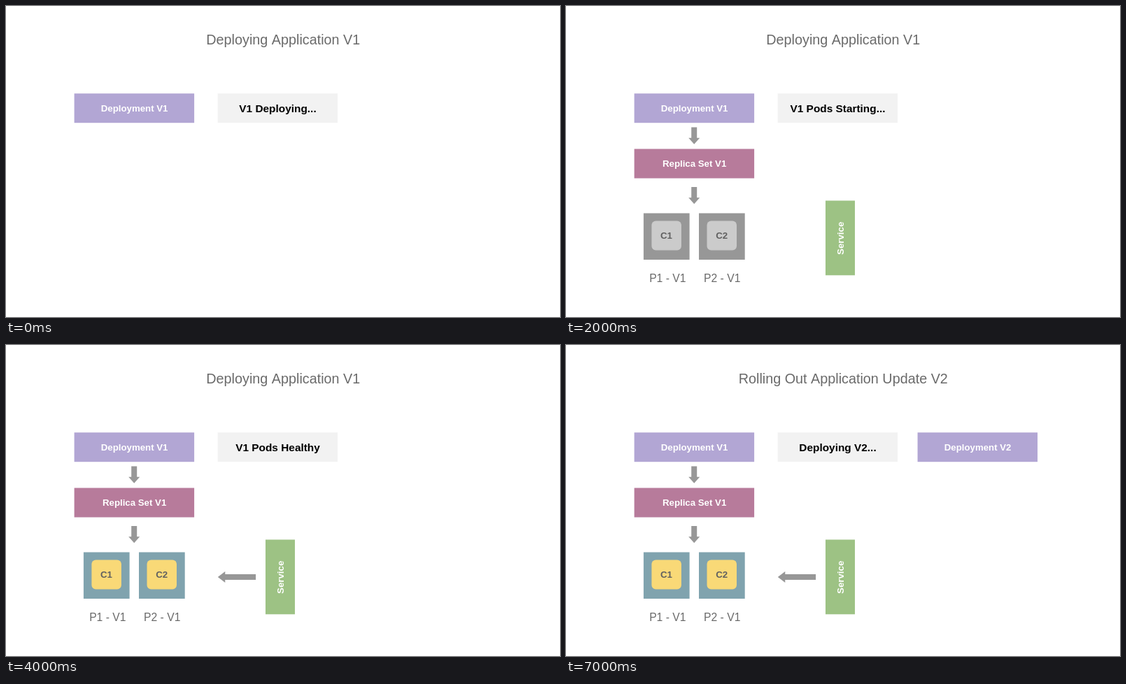
Animation, 792 px wide and 445 px high, one loop 8000 ms. Source, as an HTML page with a canvas:

```html
<!DOCTYPE html>
<html lang="en">
<head>
<meta charset="utf-8">
<title>Rolling deployment</title>
<style>
html, body { margin: 0; width: 100%; height: 100%; overflow: hidden; background: #fff; }
canvas { display: block; width: 792px; height: 445px; }
</style>
</head>
<body>
<canvas id="stage" width="792" height="445"></canvas>
<script>
const ctx = document.getElementById('stage').getContext('2d');
const LOOP = 8000;
const FONT = '"Liberation Sans", Arial, sans-serif';
const GRAY = '#979797', PURPLE = '#b2a6d4', PINK = '#b77b9b', GREEN = '#9dc284';
const TEAL = '#80a3ae', YELLOW = '#f9d977', SILVER = '#cbcbcb';

const titles = [
  [0, 'Deploying Application V1'],
  [5000, 'Application V1 Deployment Completed'],
  [7000, 'Rolling Out Application Update V2']
];
const statuses = [
  [0, 'V1 Deploying...'],
  [2000, 'V1 Pods Starting...'],
  [3000, 'V1 Pods Activating...'],
  [4000, 'V1 Pods Healthy'],
  [7000, 'Deploying V2...']
];

const current = (steps, t) => steps.filter(step => step[0] <= t).pop()[1];

function rect(x, y, w, h, color) {
  ctx.fillStyle = color;
  ctx.fillRect(x, y, w, h);
}

function text(str, x, y, size, color, weight = 'bold') {
  ctx.font = `${weight} ${size}px ${FONT}`;
  ctx.fillStyle = color;
  ctx.fillText(str, x, y);
}

function box(x, y, label, color) {
  rect(x, y, 171.5, 42, color);
  text(label, x + 86, y + 25.6, 13.25, '#fff');
}

// Arrow pointing along +x with its tip at (x, y)
function arrow(x, y, angle, length, head) {
  ctx.save();
  ctx.translate(x, y);
  ctx.rotate(angle);
  ctx.fillStyle = GRAY;
  ctx.beginPath();
  ctx.moveTo(0, 0);
  ctx.lineTo(-head, -8);
  ctx.lineTo(-head, -4);
  ctx.lineTo(-length, -4);
  ctx.lineTo(-length, 4);
  ctx.lineTo(-head, 4);
  ctx.lineTo(-head, 8);
  ctx.fill();
  ctx.restore();
}

function pod(x, n, active) {
  rect(x, 296.5, 65.7, 66.5, active ? TEAL : GRAY);
  ctx.fillStyle = active ? YELLOW : SILVER;
  ctx.beginPath();
  ctx.roundRect(x + 11.5, 307.5, 42.5, 42, 6);
  ctx.fill();
  text('C' + n, x + 32.6, 333, 13.25, '#606060');
  text(`P${n} - V1`, x + 34.4 - (n - 1) * 1.2, 394.6, 15.7, '#6a6a6a', 'normal');
}

function service() {
  rect(371, 278.5, 42, 106.8, GREEN);
  ctx.save();
  ctx.translate(396.8, 332.3);
  ctx.rotate(-Math.PI / 2);
  text('Service', 0, 0, 13.25, '#fff');
  ctx.restore();
}

function draw(t) {
  rect(0, 0, 792, 445, '#fff');
  ctx.textAlign = 'center';
  ctx.fontKerning = 'none';

  text(current(titles, t), 396.3, 55, 19.8, '#6a6a6a', 'normal');
  box(97.6, 125.2, 'Deployment V1', PURPLE);
  rect(302.6, 125.2, 171.5, 42, '#f2f2f2');
  text(current(statuses, t), 388.5, 151.7, 15.4, '#000');

  if (t >= 1000) {
    arrow(183.2, 197.7, Math.PI / 2, 24.2, 9);
    box(97.6, 204.5, 'Replica Set V1', PINK);
  }
  if (t >= 2000) {
    arrow(183.2, 283.2, Math.PI / 2, 24.2, 9);
    pod(110.9, 1, t >= 3000);
    pod(190, 2, t >= 4000);
    service();
  }
  if (t >= 3000) arrow(302.8, 332, Math.PI, 54.3, 10.5);
  if (t >= 7000) box(502.6, 125.2, 'Deployment V2', PURPLE);
}

const start = performance.now();
function tick() {
  draw((performance.now() - start) % LOOP);
  requestAnimationFrame(tick);
}
tick();
</script>
</body>
</html>
```
